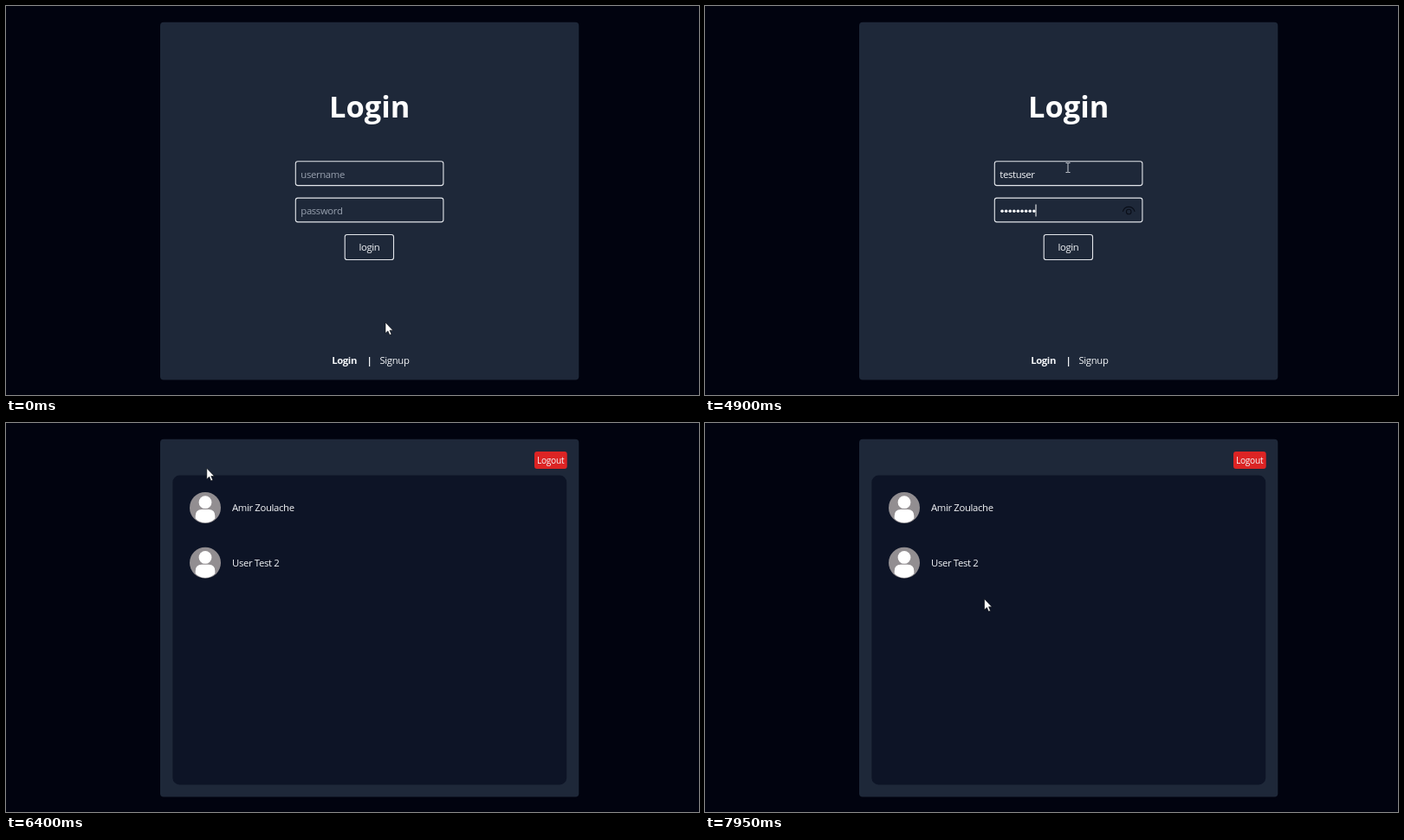
Write an HTML page that moves like this. It is 800 px wide and 450 px high and loops after 8000 ms.

```html
<!DOCTYPE html>
<html lang="en">
<head>
<meta charset="utf-8">
<title>Chat login</title>
<style>
  html, body { margin: 0; width: 100%; height: 100%; overflow: hidden; background: #01030f; }
  svg { display: block; width: 100vw; height: 100vh; }
  text { font: 11.3px "Open Sans", "Noto Sans", sans-serif; letter-spacing: -.03em; fill: #f4f6f9; white-space: pre; }
  .mid { text-anchor: middle; }
  .bold { font-weight: 700; }
  .title { font-size: 34.4px; font-weight: 700; letter-spacing: 0; fill: #fff; }
  .hint { fill: #98a1af; }
  .box { fill: none; stroke: #e3e6eb; stroke-width: 1.1; }
  .panel { fill: #0d1426; }
</style>
</head>
<body>
<svg viewBox="0 0 800 450">
  <defs>
    <g id="avatar">
      <circle r="18" fill="#928e91"/>
      <circle cy="-6.3" r="7.4" fill="#fff"/>
      <path d="M-11.3 12.5V9.5Q-11.3 2-4 2H4Q11.3 2 11.3 9.5V12.5Q7 17.2 0 17.2T-11.3 12.5Z" fill="#fff"/>
    </g>
  </defs>
  <rect width="800" height="450" fill="#01030f"/>
  <rect x="178" y="18.7" width="483.3" height="413.8" rx="4" fill="#1e2839"/>

  <g id="login"></g>
  <g id="signup"></g>

  <g id="list">
    <rect x="610" y="33" width="37.7" height="20" rx="3" fill="#dc2424"/>
    <text class="mid" x="628.6" y="46.8" style="font-size:10.2px">Logout</text>
    <rect class="panel" x="192.4" y="60.6" width="454.8" height="357.8" rx="8"/>
    <use href="#avatar" x="230" y="98"/>
    <text x="261" y="102.2">Amir Zoulache</text>
    <use href="#avatar" x="230" y="161.7"/>
    <text x="261" y="166">User Test 2</text>
  </g>

  <g id="chat">
    <path d="M208.6 36.2L201.8 43L208.6 49.8M202.5 43H218" fill="none" stroke="#fff" stroke-width="2.7" stroke-linecap="round" stroke-linejoin="round"/>
    <use id="peerAvatar" href="#avatar" transform="translate(247.6 42.8) scale(.8)"/>
    <text id="peer" x="266.8" y="47.2"></text>
    <rect class="panel" x="192.4" y="60.6" width="454.8" height="357.8" rx="8"/>
    <rect x="198" y="66.3" width="443.5" height="307" rx="3.5" fill="#000"/>
    <text class="mid" x="419.6" y="84.8" style="font-weight:600;fill:#cbd5e1">no messages yet</text>
    <rect x="198" y="378.6" width="415.4" height="34" rx="5" fill="#cbd5e1"/>
    <text class="bold hint" x="203.3" y="400.3">Type message</text>
    <path d="M636.2 387.6L618.8 397.6L623.6 399.7L633 391.2L625.6 400.6L633 403.8ZM624.8 401.5V405.4L628 402.8Z" fill="#fff" stroke="#fff" stroke-width=".7" stroke-linejoin="round"/>
  </g>

  <g id="cursor">
    <path id="arrow" d="M0 0V12.6L2.9 9.9L4.9 14.6L7 13.7L5 9.2H8.7Z" fill="#fff" stroke="#05070d" stroke-width=".6"/>
    <path id="ibeam" d="M-2.5-5.5H-.6L0-5L.6-5.5H2.5M0-5V5M-2.5 5.5H-.6L0 5L.6 5.5H2.5" fill="none" stroke="#c8ccd3" stroke-width="1"/>
    <path id="hand" d="M-1.2 1Q-1.2 0 0 0T1.2 1V5.3Q3.2 4.5 3.6 6Q5.5 5.4 5.8 6.8Q7.6 6.6 7.6 8.2V11Q7.6 13 6.3 15H-.6Q-2 12-4.2 9.5Q-4.4 7.4-1.2 9.2Z" fill="#fff" stroke="#05070d" stroke-width=".6"/>
  </g>
</svg>
<script>
const LOOP = 8000, STEP = 50;
const $ = id => document.getElementById(id);
const show = (el, on) => el.setAttribute("display", on ? "inline" : "none");

const label = (x, y, text, cls = "", id = "") =>
  `<text id="${id}" x="${x}" y="${y}" class="${cls}">${text}</text>`;
const box = (x, y, w, h) =>
  `<rect class="box" x="${x}" y="${y}" width="${w}" height="${h}" rx="2.6"/>`;
const field = (y, text, id = "") =>
  box(334.3, y, 170.6, 27.8) + label(340.3, y + 18.8, text, "hint", id);
const button = (y, text) =>
  box(391.2, y, 56.3, 29) + label(419.4, y + 18.7, text, "mid");
const nav = active =>
  label(390.6, 414.3, "Login", active === "login" ? "mid bold" : "mid") +
  label(419.4, 414, "|", "mid bold") +
  label(448.5, 414.3, "Signup", active === "signup" ? "mid bold" : "mid");

$("login").innerHTML = label(419.7, 129, "Login", "mid title") +
  field(179.8, "username", "user") + field(222.1, "password", "pass") +
  `<g id="dots"></g>` +
  `<g id="eye" fill="none" stroke="#0a0e18" stroke-width="1.1">
     <path d="M482.3 237.8Q484 232.4 489.2 232.4T496.1 237.8"/><circle cx="489.2" cy="238" r="2.8"/></g>` +
  `<path id="caret" stroke="#fff" stroke-width="1"/>` +
  button(264.5, "login") + nav("login");

$("signup").innerHTML = label(419.7, 98.3, "Sign up", "mid title") +
  ["name", "username", "password", "verify password"]
    .map((text, i) => field(143.4 + i * 42.4, text)).join("") +
  button(313.3, "signup") + nav("signup");

const NAME = "testuser", SECRET_LENGTH = 9;
$("dots").innerHTML = Array.from({ length: SECRET_LENGTH }, (_, i) =>
  `<circle cx="${343 + i * 4.6}" cy="237.3" r="1.75" fill="#f4f6f9"/>`).join("");
const dots = [...$("dots").children];

// [start time, screen, chat partner]
const screens = [
  [0, "login"], [1150, "signup"], [1900, "login"], [4950, "list"],
  [5700, "chat", "User Test 2"], [6250, "list"],
  [6650, "chat", "Amir Zoulache"], [7700, "list"]
];

// [time, x, y]
const path = [
  [0, 438, 366], [400, 438, 366], [800, 448, 407], [1350, 448, 407],
  [1550, 495, 337], [1850, 392, 411], [2200, 392, 411], [2500, 419, 187],
  [5250, 419, 187], [5600, 380, 152.5], [5800, 380, 152.5], [6150, 207, 41],
  [6300, 207, 41], [6600, 302.5, 84.5], [6950, 302.5, 84.5], [7550, 206, 41],
  [7750, 206, 41], [7950, 322.5, 203.5]
];

function pointer(t) {
  const i = path.findIndex(p => p[0] > t);
  if (i < 0) return path[path.length - 1].slice(1);
  const [t0, x0, y0] = path[i - 1], [t1, x1, y1] = path[i];
  const k = (t - t0) / (t1 - t0), e = k * k * (3 - 2 * k);
  return [x0 + (x1 - x0) * e, y0 + (y1 - y0) * e];
}

const typed = (t, start, pace, max) =>
  t < start ? 0 : Math.min(max, Math.floor((t - start) / pace) + 1);

function drawForm(t) {
  const chars = typed(t, 2570, 110, NAME.length);
  const secret = typed(t, 3900, 85, SECRET_LENGTH);
  const user = $("user");
  user.textContent = chars ? NAME.slice(0, chars) : "username";
  user.setAttribute("class", chars ? "" : "hint");
  show($("pass"), !secret);
  show($("eye"), secret);
  dots.forEach((dot, i) => show(dot, i < secret));

  const inPassword = t >= 3600;
  const x = inPassword ? 340.6 + secret * 4.6
    : 340.6 + (chars ? user.getComputedTextLength() : 0);
  $("caret").setAttribute("d", `M${x} ${inPassword ? 229.5 : 187}v14`);
  show($("caret"), t >= 2500);
}

function draw(t) {
  const [start, screen, peer] = screens.filter(s => s[0] <= t).pop();
  for (const id of ["login", "signup", "list", "chat"]) show($(id), id === screen);
  if (screen === "login") drawForm(t);
  if (screen === "chat") {
    $("peer").textContent = peer;
    show($("peerAvatar"), t >= start + (peer === "User Test 2" ? 100 : 50));
  }

  const [x, y] = pointer(t);
  const overField = screen === "login" && ((y > 180 && y < 208) || (y > 222 && y < 250));
  const shape = overField ? "ibeam" : y > 403 ? "hand" : "arrow";
  for (const id of ["arrow", "ibeam", "hand"]) show($(id), id === shape);
  $("cursor").setAttribute("transform", `translate(${x} ${y})`);
}

const begin = performance.now();
function tick() {
  const t = (performance.now() - begin) % LOOP;
  draw(Math.floor(t / STEP) * STEP);
  requestAnimationFrame(tick);
}
tick();
</script>
</body>
</html>
```
